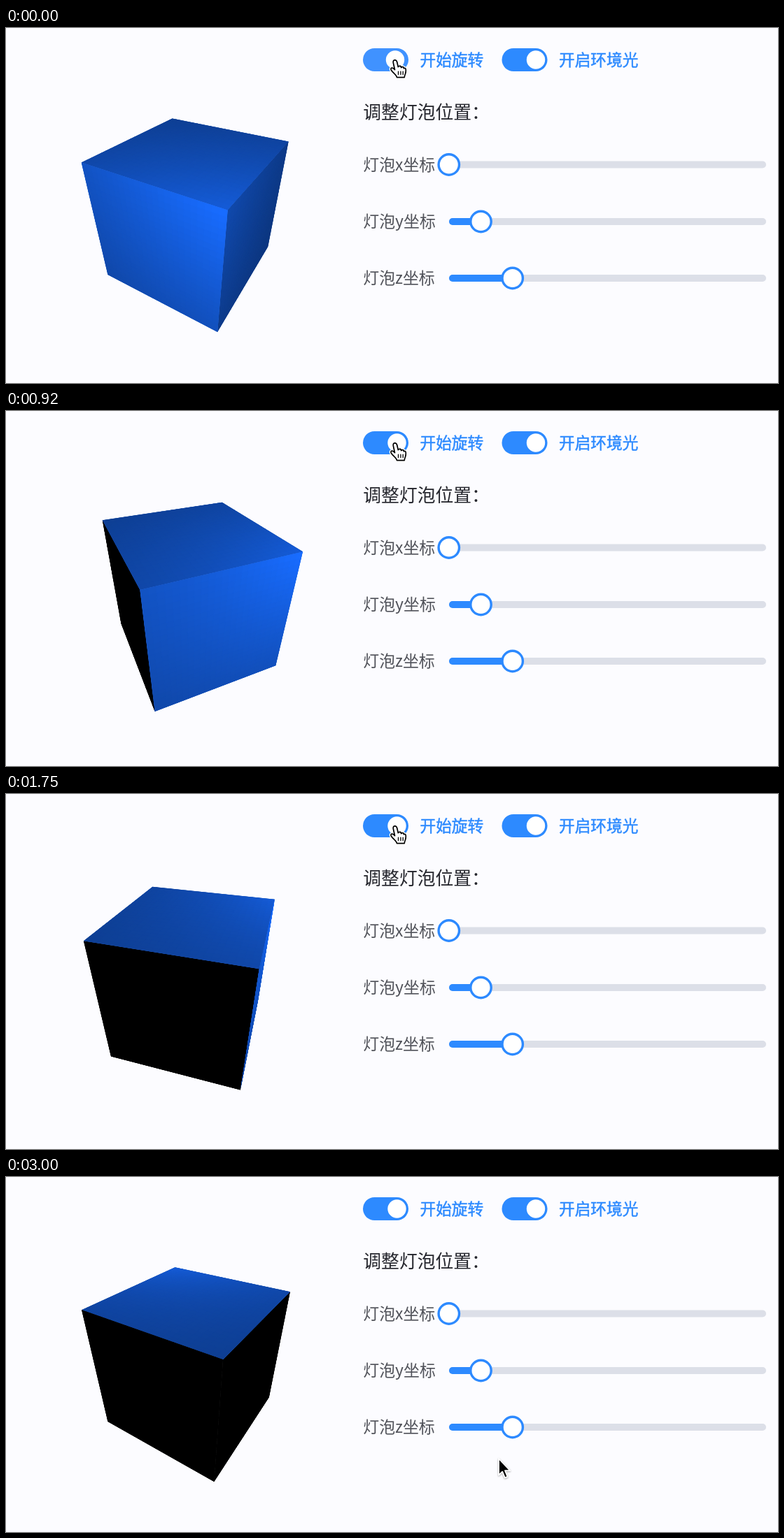
Write an HTML page with a canvas that moves like this. It is 1103 px wide and 508 px high and loops after 3.08 s.

```html
<!DOCTYPE html>
<html lang="zh-CN">
<head>
<meta charset="utf-8">
<title>立方体光照</title>
<style>
  html, body { margin: 0; width: 100%; height: 100%; overflow: hidden; background: #fcfcff; }
  canvas, svg { position: absolute; left: 0; top: 0; width: 1103px; height: 508px; }
  text { font-family: 'Noto Sans CJK SC', 'Noto Sans CJK', 'Noto Sans', sans-serif; font-size: 22.9px; fill: #505259; }
  .on { font-size: 22.7px; fill: #2d8aff; stroke: #2d8aff; stroke-width: 0.5px; }
  .head { font-size: 25.8px; fill: #25262d; }
</style>
</head>
<body>
<canvas id="cube" width="1103" height="508"></canvas>
<svg id="ui" viewBox="0 0 1103 508">
  <rect id="spinTrack" x="510" y="29" width="65" height="33" rx="16.5" fill="#2d8aff"/>
  <circle id="spinKnob" cx="558.5" cy="45.5" r="13.2" fill="#fff"/>
  <text class="on" x="591.5" y="54">开始旋转</text>
  <rect x="708.5" y="29" width="65" height="33" rx="16.5" fill="#2d8aff"/>
  <circle cx="757" cy="45.5" r="13.2" fill="#fff"/>
  <text class="on" x="790" y="54">开启环境光</text>
  <text class="head" x="510.3" y="130">调整灯泡位置：</text>
  <g id="sliders"></g>
  <g id="hand" transform="translate(-1.3 -0.3)" stroke-linejoin="round" stroke-linecap="round">
    <path id="palm" d="M554.6 50C553.6 45.4 558.8 44.6 560 49L561.6 56C562.4 54 566 54.2 566 57C567 55.2 569.6 55.6 569.8 58.2C571 57 573 57.8 572.6 61.5C572.8 65.5 570.8 67 570.5 71H559.8C559.4 67.4 553.4 64 551.6 60.4C550 57 553.8 56 556.8 60Z" fill="#fff" stroke="#fff" stroke-width="4.5"/>
    <path id="outline" fill="#fff" stroke="#000" stroke-width="1.7"/>
    <path fill="none" stroke="#000" stroke-width="1.3" d="M561.8 62.5V67M565.2 62.5V67M568.5 62.5V67"/>
  </g>
  <path id="arrow" d="M0 0V23.5L5.2 18.6L8.8 27.4L12.6 25.8L9 17.2H16.2Z" fill="#000" stroke="#fff" stroke-width="1.8" stroke-linejoin="round" style="filter:drop-shadow(0 1px 1px #0005)"/>
</svg>
<script>
const $ = id => document.getElementById(id);
const ctx = $('cube').getContext('2d');
const LOOP = 3080, SPAN = 250, HOLD = 170, CELLS = 24;

$('outline').setAttribute('d', $('palm').getAttribute('d'));
$('sliders').innerHTML = [['x', 632.8, 195.5], ['y', 678.5, 277], ['z', 723.7, 358]].map(([axis, x, y]) => `
  <text x="510.3" y="${y + 8}">灯泡${axis}坐标</text>
  <rect x="633" y="${y - 5}" width="453" height="10" rx="5" fill="#dcdfe8"/>
  <rect x="633" y="${y - 5}" width="${Math.max(0, x - 633)}" height="10" rx="5" fill="#2d8aff"/>
  <circle cx="${x}" cy="${y}" r="14.7" fill="#fff" stroke="#2d8aff" stroke-width="3.4"/>`).join('');

// time in ms, turn in degrees
const turns = [[0, -31.1], [500, -2], [920, 24], [1420, 51.7], [1750, 73], [2250, 103], [3000, 147]];
function turnAt(t) {
  let i = 1;
  while (i < turns.length - 1 && t > turns[i][0]) i++;
  const [t0, a0] = turns[i - 1], [t1, a1] = turns[i];
  return (a0 + (a1 - a0) * (t - t0) / (t1 - t0)) * Math.PI / 180;
}

const PITCH = Math.atan(Math.SQRT1_2), SIN = Math.sin(PITCH), COS = Math.cos(PITCH);
const FOCAL = 426, DIST = 4.55, CX = 266, CY = 264;
function project([x, y, z], a) {
  const X = x * Math.cos(a) + z * Math.sin(a), Z = z * Math.cos(a) - x * Math.sin(a);
  const k = FOCAL / (DIST - y * SIN - Z * COS);
  return [CX + X * k, CY - (y * COS - Z * SIN) * k];
}

// the lamp turns with the cube
const LAMP = [1.8, 2.2, 2.6], BLUE = [24, 108, 255];
function shade(p, axis, sign) {
  const d = LAMP.map((v, i) => v - p[i]);
  const dot = sign * d[axis] / Math.hypot(...d);
  const k = dot > 0 ? Math.min(1, 0.35 + 0.89 * dot) : 0;
  return `rgb(${BLUE.map(c => Math.round(c * k))})`;
}

function trace(points) {
  ctx.beginPath();
  points.forEach(p => ctx.lineTo(...p));
  ctx.closePath();
}

function drawFace(axis, sign, a) {
  const u = (axis + (sign > 0 ? 1 : 2)) % 3, v = 3 - axis - u;
  const at = (i, j) => {
    const p = [];
    p[axis] = sign; p[u] = i; p[v] = j;
    return p;
  };
  const quad = (i0, j0, i1, j1) =>
    [[i0, j0], [i1, j0], [i1, j1], [i0, j1]].map(([i, j]) => project(at(i, j), a));
  const q = quad(-1, -1, 1, 1);
  const area = (q[1][0] - q[0][0]) * (q[2][1] - q[0][1]) - (q[1][1] - q[0][1]) * (q[2][0] - q[0][0]);
  if (area >= 0) return;

  trace(q);
  ctx.fillStyle = shade(at(0, 0), axis, sign);
  ctx.fill();
  ctx.save();
  ctx.clip();
  const step = 2 / CELLS;
  for (let m = 0; m < CELLS; m++) for (let n = 0; n < CELLS; n++) {
    const i = -1 + m * step, j = -1 + n * step;
    trace(quad(i, j, i + step, j + step));
    ctx.fillStyle = ctx.strokeStyle = shade(at(i + step / 2, j + step / 2), axis, sign);
    ctx.fill();
    ctx.stroke();
  }
  ctx.restore();
}

function draw(t) {
  const a = turnAt(t);
  ctx.clearRect(0, 0, 1103, 508);
  for (let axis = 0; axis < 3; axis++) for (const sign of [-1, 1]) drawFace(axis, sign, a);

  $('spinTrack').setAttribute('fill', t < HOLD ? '#4092ff' : '#2d8aff');
  $('spinKnob').setAttribute('cx', t < HOLD ? 556 : 558.5);

  const left = t >= 2920;
  $('hand').style.display = left ? 'none' : '';
  $('arrow').style.display = left ? '' : 'none';
  $('arrow').setAttribute('transform', t < 3000 ? 'translate(714 388)' : 'translate(704 403)');
}

let shown = -1;
const start = performance.now();
function tick() {
  const t = (performance.now() - start) % LOOP, part = t % SPAN;
  const held = Math.round(t - part + (part < HOLD ? 0 : HOLD));
  if (held !== shown) draw(shown = held);
  requestAnimationFrame(tick);
}
tick();
</script>
</body>
</html>
```
